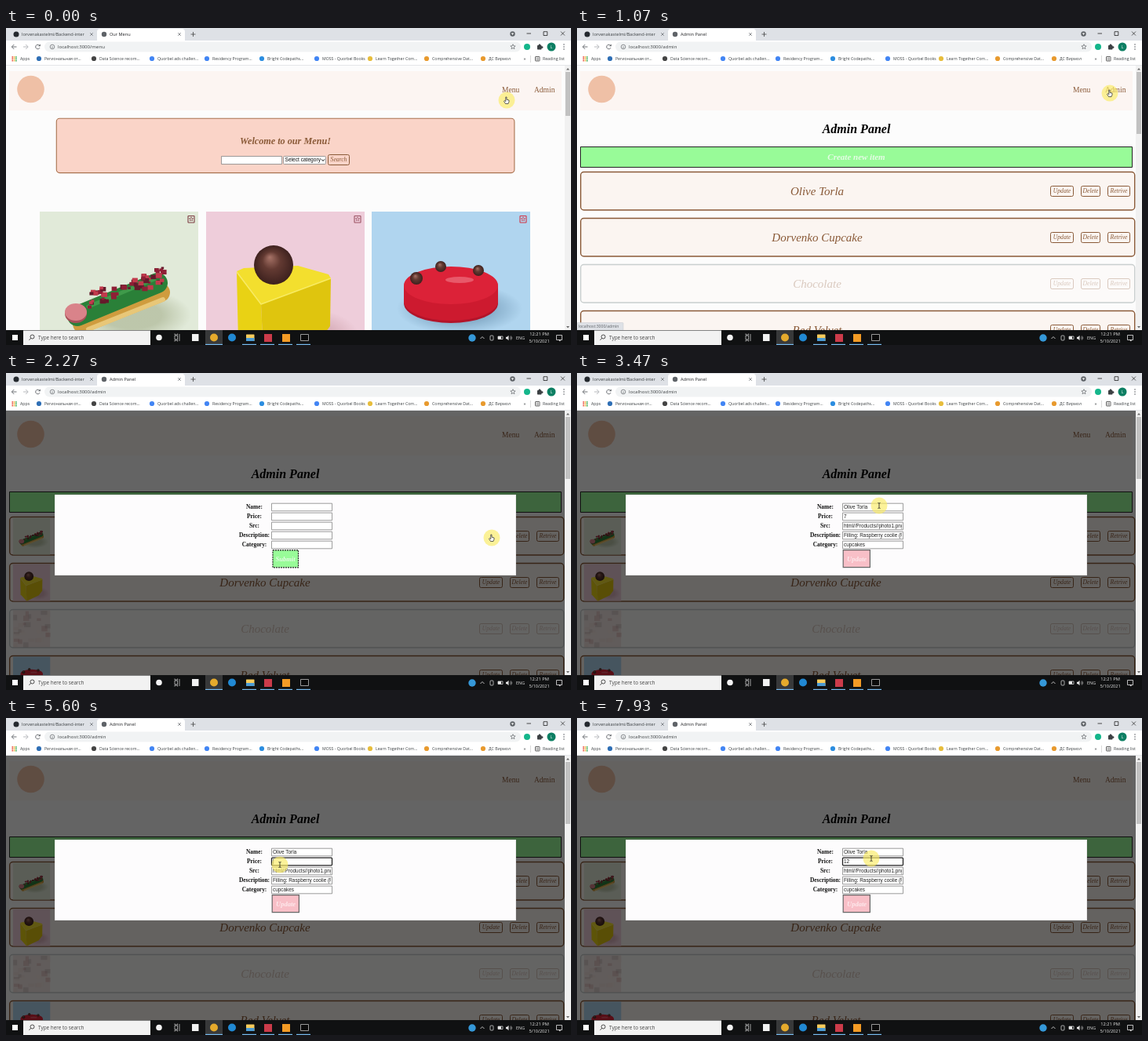
An HTML page with a canvas for the animation above (8000 ms loop, 720 by 404 pixels).

```html
<!DOCTYPE html>
<html lang="en">
<head>
<meta charset="utf-8">
<title>Cake shop admin</title>
<style>
html, body { margin: 0; width: 100%; height: 100%; overflow: hidden; background: #fcfcfc; }
canvas { display: block; width: 720px; height: 404px; }
</style>
</head>
<body>
<canvas id="stage"></canvas>
<script>
const W = 720, H = 404, LOOP = 8000;
const canvas = document.getElementById('stage');
const c = canvas.getContext('2d');
const dpr = window.devicePixelRatio || 1;
canvas.width = W * dpr;
canvas.height = H * dpr;

const UI = '"Open Sans", "Noto Sans", sans-serif';
const SERIF = '"Liberation Serif", serif';
const ARIAL = '"Liberation Sans", sans-serif';
const BROWN = '#8a5a38';

// Times of the hard changes, in ms
const T = { page: 970, images: 1270, modal: 2070, filled: 2400, focus: 4500, clear: 5100, one: 6600, two: 6950 };

// Pointer path: time, x, y
const PATH = [
  [70, 638, 92], [760, 679, 84], [1150, 679, 83], [1720, 621, 208],
  [2200, 619, 210], [2650, 619, 210], [3400, 385, 169], [3800, 385, 169],
  [4400, 349, 187], [7200, 349, 187], [7930, 375, 179]
];

function rect(x, y, w, h, fill, stroke, r = 0, lw = 1) {
  c.beginPath();
  c.roundRect(x, y, w, h, r);
  if (fill) { c.fillStyle = fill; c.fill(); }
  if (stroke) { c.strokeStyle = stroke; c.lineWidth = lw; c.stroke(); }
}

function oval(x, y, rx, ry, fill) {
  c.beginPath();
  c.ellipse(x, y, rx, ry, 0, 0, 7);
  c.fillStyle = fill;
  c.fill();
}

const dot = (x, y, r, fill) => oval(x, y, r, r, fill);

function ring(x, y, r, color, lw = 0.8, from = 0, to = 7) {
  c.beginPath();
  c.arc(x, y, r, from, to);
  c.strokeStyle = color;
  c.lineWidth = lw;
  c.stroke();
}

function trace(pts) {
  c.beginPath();
  for (let i = 0; i < pts.length; i += 2) c.lineTo(pts[i], pts[i + 1]);
}

function line(color, lw, ...pts) {
  trace(pts);
  c.strokeStyle = color;
  c.lineWidth = lw;
  c.stroke();
}

function poly(fill, ...pts) {
  trace(pts);
  c.fillStyle = fill;
  c.fill();
}

// y is the optical middle of the line
function text(s, x, y, size, color, family = UI, style = '', align = 'left') {
  c.font = `${style} ${size}px ${family}`;
  c.textAlign = align;
  c.fillStyle = color;
  c.fillText(s, x, y + size * 0.33);
}

const script = (s, x, y, size, color, weight = '') =>
  text(s, x, y, size, color, SERIF, 'italic ' + weight, 'center');

function cross(x, y, r, color) {
  line(color, 0.7, x - r, y - r, x + r, y + r);
  line(color, 0.7, x - r, y + r, x + r, y - r);
}

function clipped(x, y, w, h, draw) {
  c.save();
  c.beginPath();
  c.rect(x, y, w, h);
  c.clip();
  draw();
  c.restore();
}

function seeded(seed) {
  return () => (seed = (seed * 16807) % 2147483647) / 2147483647;
}

function ball(x, y, r) {
  const g = c.createRadialGradient(x - r * 0.2, y - r * 0.4, 0, x, y, r);
  g.addColorStop(0, '#a87468');
  g.addColorStop(0.45, '#633a32');
  g.addColorStop(1, '#3d211e');
  dot(x, y, r, g);
}

// Soft round shadow that fades out to the edge
function shadow(x, y, rx, ry, rgb) {
  c.save();
  c.translate(x, y);
  c.scale(1, ry / rx);
  const g = c.createRadialGradient(0, 0, rx * 0.5, 0, 0, rx);
  g.addColorStop(0, `rgba(${rgb},.6)`);
  g.addColorStop(1, `rgba(${rgb},0)`);
  dot(0, 0, rx, g);
  c.restore();
}

// Sweets are drawn in a 202 x 202 picture
const sweets = [
  function eclair() {
    rect(0, 0, 202, 202, '#e1ead9');
    shadow(118, 132, 75, 34, '165,175,140');
    c.lineCap = 'round';
    line('#cf9c3e', 24, 54, 143, 154, 103);
    line('#e8c778', 6, 62, 150, 157, 112);
    line('#2a8038', 26, 48, 133, 150, 91);
    line('#3f9a4a', 5, 62, 121, 146, 86);
    c.lineCap = 'butt';
    const rnd = seeded(41);
    for (let i = 0; i < 60; i++) {
      const k = rnd(), s = 3 + rnd() * 5;
      rect(61 + k * 95, 110 - k * 32 + (rnd() - 0.5) * 20, s, s * 0.8, ['#8e1f35', '#c23a4c', '#651a2b'][i % 3]);
    }
    oval(46, 130, 14, 12, '#a84f58');
    oval(46, 128, 14, 11, '#d9838a');
  },
  function wedge() {
    rect(0, 0, 202, 202, '#eecdda');
    shadow(135, 160, 60, 35, '205,160,170');
    c.lineJoin = 'round';
    poly('#e9d214', 39, 77, 70, 118, 74, 202, 41, 166);
    poly('#dfc50e', 70, 118, 159, 84, 158, 146, 140, 170, 74, 202);
    poly('#f3df2e', 39, 76, 48, 72, 117, 69, 156, 80, 159, 85, 70, 118);
    line('#f8eb62', 1.5, 39, 77, 70, 118, 159, 85);
    ball(86, 68, 25);
  },
  function disc() {
    rect(0, 0, 202, 202, '#b0d5ef');
    shadow(112, 124, 80, 32, '105,145,175');
    oval(101, 117, 60, 25, '#b3142a');
    rect(41, 94, 120, 23, '#cd1a2f');
    oval(101, 114, 60, 25, '#cd1a2f');
    oval(101, 94, 60, 24, '#dc2238');
    oval(112, 87, 18, 4, '#e8596a');
    ball(57, 85, 8);
    ball(88, 70, 7);
    ball(136, 75, 7);
  },
  function box() {
    rect(0, 0, 202, 202, '#dcbab6');
    const rnd = seeded(77);
    for (let i = 0; i < 32; i++) {
      rect(rnd() * 180, rnd() * 180, 15 + rnd() * 25, 12 + rnd() * 20, ['#f3e4df', '#c48a8a', '#a59a9c', '#ead0ca'][i % 4]);
    }
  }
];

function photo(draw, x, y, size) {
  clipped(x, y, size, size, () => {
    c.translate(x, y);
    c.scale(size / 202, size / 202);
    draw();
  });
}

function tabs(title) {
  rect(0, 0, W, 16, '#dee1e6');
  dot(13, 8, 3.5, '#24292e');
  text('lorvenakastelmi/Backend-inter', 20, 8, 5.6, '#3c4043');
  cross(109, 8, 1.8, '#5f6368');
  rect(116, 1, 112, 18, '#fff', null, 4);
  dot(125, 8, 3.2, '#5f6368');
  text(title, 132, 8, 5.6, '#202124');
  cross(221, 8, 1.8, '#5f6368');
  line('#444', 0.8, 235.5, 8, 241.5, 8);
  line('#444', 0.8, 238.5, 5, 238.5, 11);
  dot(645.5, 7.5, 3.2, '#5f6368');
  poly('#fff', 643.8, 6.5, 647.2, 6.5, 645.5, 9);
  line('#222', 0.8, 663.5, 7, 669, 7);
  rect(685, 4.7, 4.8, 4.8, null, '#222', 0, 0.8);
  cross(709.5, 7, 2.5, '#222');
}

function toolbar(url) {
  rect(0, 16, W, 32, '#fff');
  const gray = '#5f6368';
  line(gray, 0.9, 13.5, 24, 7.5, 24);
  line(gray, 0.9, 10.3, 21, 7.3, 24, 10.3, 27);
  line('#b0b3b7', 0.9, 22, 24, 28, 24);
  line('#b0b3b7', 0.9, 25.2, 21, 28.2, 24, 25.2, 27);
  ring(40.5, 24, 2.8, gray, 0.9, 0.4, 5.6);
  poly(gray, 41, 23.2, 43.8, 23.2, 43.8, 20.4);
  rect(49, 17.5, 607, 13, '#f1f3f4', null, 6.5);
  ring(59, 24, 2.8, gray, 0.7);
  line(gray, 0.8, 59, 23.4, 59, 25.6);
  text(url, 66, 24, 6.1, '#3c4043');
  star(646, 24, 3.3, gray);
  dot(664, 24, 4, '#15b68b');
  rect(677, 22, 5.5, 5.5, '#3c4043', null, 0.7);
  dot(680, 21.8, 1.4, '#3c4043');
  dot(683, 24.6, 1.4, '#3c4043');
  dot(695, 24, 5.5, '#0d7f63');
  text('L', 695, 24, 5, '#fff', UI, '', 'center');
  for (const y of [21, 24, 27]) dot(711, y, 0.8, gray);
}

function star(x, y, r, color) {
  const pts = [];
  for (let i = 0; i <= 10; i++) {
    const a = -Math.PI / 2 + i * Math.PI / 5, k = i % 2 ? r * 0.45 : r;
    pts.push(x + k * Math.cos(a), y + k * Math.sin(a));
  }
  line(color, 0.7, ...pts);
}

const BOOKMARKS = [
  [42, '#2f6fb5', 'Региональная от...'], [112, '#444', 'Data Science recom...'],
  [186, '#4285f4', 'Quorbel ads challen...'], [256, '#4285f4', 'Residency Program...'],
  [326, '#2b8de0', 'Bright Codepaths...'], [396, '#4285f4', 'MOSS - Quorbel Books'],
  [464, '#e7bd3c', 'Learn Together Com...'], [536, '#e89a2e', 'Comprehensive Dat...'],
  [608, '#e89a2e', 'ДС Вирмол']
];

function bookmarks() {
  for (let i = 0; i < 9; i++) {
    rect(7.5 + (i % 3) * 2.3, 36.2 + Math.floor(i / 3) * 2.3, 1.6, 1.6, ['#ea4335', '#f3ad28', '#34a853'][i % 3]);
  }
  text('Apps', 18, 39.3, 5.2, '#3c4043');
  for (const [x, color, label] of BOOKMARKS) {
    dot(x, 39, 3.1, color);
    text(label, x + 7, 39.3, 5.2, '#3c4043');
  }
  text('»', 661, 39, 6, '#3c4043', UI, '', 'center');
  line('#ccc', 0.7, 668.5, 35, 668.5, 44);
  rect(674.5, 36.5, 5.5, 5.5, null, '#444', 0.5, 0.8);
  for (const y of [38, 39.5, 41]) line('#444', 0.5, 675.5, y, 679, y);
  text('Reading list', 684, 39.3, 5.2, '#3c4043');
  rect(0, 47, W, 1, '#e4e6e9');
}

function header() {
  rect(0, 48, 712, 338, '#fcfcfc');
  rect(4, 55, 704, 50, '#fcf5f2');
  dot(31.5, 78, 17.3, '#efc0a6');
  text('Menu', 632, 78.5, 9.5, BROWN, SERIF);
  text('Admin', 673, 78.5, 9.5, BROWN, SERIF);
}

function scrollbar(end) {
  rect(712, 48, 8, 338, '#f1f1f1');
  rect(713, 56, 6, end - 56, '#c1c1c1');
  poly('#666', 714, 53.5, 718, 53.5, 716, 51);
  poly('#666', 714, 380, 718, 380, 716, 382.5);
}

function outlineButton(label, x, y, w, fill) {
  rect(x + 0.5, y + 0.5, w - 1, 13, fill, BROWN, 2, 1);
  script(label, x + w / 2, y + 6.5, 7.6, BROWN);
}

function menuPage() {
  rect(64.3, 115.2, 583.6, 69.4, '#fad4c8', '#a9724f', 4, 1.1);
  script('Welcome to our Menu!', 356, 143.5, 12.2, BROWN, 'bold');
  rect(274.5, 163.5, 77, 10, '#fff', '#858585', 0, 0.8);
  rect(353.5, 163.5, 54, 10, '#fff', '#858585', 1, 0.8);
  text('Select category', 355.5, 168.3, 6.6, '#111', ARIAL);
  line('#111', 1, 402, 167.3, 404, 169.5, 406, 167.3);
  outlineButton('Search', 410, 161, 28);
  [43, 255, 466].forEach((x, i) => {
    const color = ['#7d3b42', '#9b5263', '#d23445'][i];
    photo(sweets[i], x, 234, 202);
    rect(x + 189, 239.5, 8, 8.5, null, color, 0.5, 1.1);
    star(x + 193, 243.5, 2.7, color);
  });
}

const ROWS = ['Olive Torla', 'Dorvenko Cupcake', 'Chocolate', 'Red Velvet'];
const ROW_SWEETS = [0, 1, 3, 2];

function adminPage(t) {
  const loaded = t >= T.images;
  const hover = t > 1660 && t < T.modal;
  script('Admin Panel', 356, 128.5, 16, '#000', 'bold');
  rect(4.5, 151.5, 703, 26, '#98fb98', '#222', 0, 1);
  script('Create new item', 356, 164.5, 11, '#e6fbe6', 'bold');
  ROWS.forEach((name, i) => {
    const y = 183 + i * 59;
    c.globalAlpha = i === 2 ? 0.3 : 1;
    rect(4.7, y + 0.5, 706, 48.5, '#fbf5f1', i === 2 ? '#566' : BROWN, 4, 1.4);
    if (loaded) photo(sweets[ROW_SWEETS[i]], 9, y + 1.2, 47.5);
    script(name, loaded ? 330 : 306, y + 25, 15, BROWN);
    outlineButton('Update', 603, y + 18, 30, hover && i === 0 ? '#f4bcc2' : null);
    outlineButton('Delete', 642, y + 18, 25);
    outlineButton('Retrive', 676, y + 18, 29);
    c.globalAlpha = 1;
  });
}

function priceAt(t) {
  if (t < T.clear) return '7';
  return t < T.one ? '' : t < T.two ? '1' : '12';
}

function modal(t) {
  rect(0, 48, 712, 338, 'rgba(0,0,0,.6)');
  rect(62, 155, 588, 103, '#d8d8d8');
  rect(62.5, 155.5, 587, 102, '#fdfcfd');
  const filled = t >= T.filled, focused = t >= T.focus;
  const values = ['Olive Torla', priceAt(t), 'html//Products//photo1.png', 'Filling: Raspberry coolie (Fresh)', 'cupcakes'];
  ['Name:', 'Price:', 'Src:', 'Description:', 'Category:'].forEach((label, i) => {
    const y = 171 + i * 12;
    text(label, 316.5, y, 7.4, '#111', SERIF, 'bold', 'center');
    if (i === 1 && focused) rect(338.5, y - 4.8, 77, 9.6, '#fff', '#222', 1, 1.3);
    else rect(338.5, y - 4.8, 77, 9.6, '#fff', '#858585', 0, 0.8);
    if (filled) clipped(340, y - 4.5, 74, 9, () => text(values[i], 340, y, 6.4, '#222', ARIAL));
  });
  if (focused) {
    const last = [T.two, T.one, T.clear, T.focus].find(v => t >= v);
    if (Math.floor((t - last) / 530) % 2 === 0) {
      c.font = `6.4px ${ARIAL}`;
      rect(340.5 + c.measureText(priceAt(t)).width, 179.5, 0.6, 7, '#000');
    }
  }
  if (filled) {
    rect(339.2, 225.7, 34.2, 22, '#f8bfc7', '#666', 0, 1.2);
    script('Update', 356.5, 237, 8.5, '#fde9ec', 'bold');
  } else {
    c.setLineDash([2, 1]);
    rect(340, 225.8, 32.5, 22, '#98fb98', '#222', 0, 1.2);
    c.setLineDash([]);
    script('Submit', 356, 237, 8.5, '#e6fbe6', 'bold');
  }
}

function status() {
  rect(0, 375.5, 59, 10, '#dee1e6', '#c6c9ce', 1, 0.5);
  text('localhost:3000/admin', 2, 380.5, 5.1, '#5f6368');
}

function taskbar() {
  rect(0, 385, W, 19, '#101112');
  rect(8, 391, 7, 7, '#fff');
  rect(22, 385.5, 162, 18.5, '#f2f2f2');
  ring(33.5, 393.5, 2.5, '#222', 0.8);
  line('#222', 0.8, 31.7, 395.3, 29.5, 397.8);
  text('Type here to search', 41, 394.8, 6.4, '#444');
  dot(195, 394.5, 3.8, '#f2f2f2');
  rect(215, 392, 3.6, 5, null, '#ddd', 0, 0.7);
  line('#ddd', 0.7, 215, 389.5, 215, 391, 218.6, 391, 218.6, 389.5);
  line('#ddd', 0.7, 215, 399.5, 215, 398, 218.6, 398, 218.6, 399.5);
  line('#ddd', 0.7, 221, 390, 221, 399);
  rect(254, 385, 22, 19, '#38393a');
  rect(237, 390, 8.5, 9, '#f2f2f2');
  dot(265, 394.5, 5, '#e5aa2c');
  dot(288, 394.5, 5, '#2189d3');
  rect(306, 390.5, 10.5, 8.5, '#f5cb5c', null, 0.6);
  rect(306, 395, 10.5, 4, '#4b9bd4');
  rect(329, 390, 10, 10, '#cb3b4a');
  rect(352, 390, 10, 10, '#f39b25');
  rect(375.5, 390.5, 10, 8, '#0a0a0a', '#bbb', 0, 0.8);
  for (const x of [254, 301, 324, 347, 370]) rect(x, 402.8, x === 254 ? 22 : 18, 1.2, '#76b9ed');

  const pale = '#e8e8e8';
  dot(594, 395, 4.7, '#3598d8');
  line(pale, 0.8, 604.5, 396, 607, 393.5, 609.5, 396);
  rect(617, 392, 4, 6, null, pale, 1, 0.7);
  rect(627, 393, 6, 3.5, null, pale, 0, 0.7);
  rect(627, 393, 4, 3.5, pale);
  poly(pale, 637, 393.7, 638.5, 393.7, 640.5, 391.7, 640.5, 398.3, 638.5, 396.3, 637, 396.3);
  ring(641, 395, 2, pale, 0.6, -0.8, 0.8);
  ring(641, 395, 3.5, pale, 0.6, -0.8, 0.8);
  text('ENG', 650, 395, 5.5, pale);
  text('12:21 PM', 679.5, 390.6, 5.7, pale, UI, '', 'center');
  text('5/10/2021', 679.5, 399.5, 5.5, pale, UI, '', 'center');
  rect(701.5, 391.5, 7, 6, null, pale, 0, 0.8);
  poly(pale, 704, 397.5, 707, 397.5, 706, 399.5);
}

function pointerAt(t) {
  const i = PATH.findIndex(p => p[0] > t);
  if (i === 0) return PATH[0].slice(1);
  if (i < 0) return PATH[PATH.length - 1].slice(1);
  const [t0, x0, y0] = PATH[i - 1], [t1, x1, y1] = PATH[i];
  const k = (t - t0) / (t1 - t0), e = k * k * (3 - 2 * k);
  return [x0 + (x1 - x0) * e, y0 + (y1 - y0) * e];
}

const overAdmin = (x, y) => x > 672 && y < 92;

function pointerKind(x, y, t) {
  if (t >= T.modal) return t < 2330 ? 'hand' : x < 418 ? 'beam' : 'arrow';
  const link = overAdmin(x, y) || (x < 655 && y < 97);
  const button = t >= T.page && x < 633 && y > 200;
  return link || button ? 'hand' : 'arrow';
}

function pointer(t) {
  const [x, y] = pointerAt(t);
  const kind = pointerKind(x, y, t);
  dot(x, y, 10.5, 'rgba(250,236,100,.66)');
  c.save();
  c.translate(x, y);
  c.lineJoin = 'round';
  if (kind === 'beam') {
    line('#222', 0.8, -1.6, -3.5, 0, -3, 1.6, -3.5);
    line('#222', 0.8, 0, -3, 0, 3);
    line('#222', 0.8, -1.6, 3.5, 0, 3, 1.6, 3.5);
  } else {
    const pts = kind === 'hand'
      ? [-1.2, -4, 0, -4, 0, -0.8, 3, 0, 3, 2, 2, 4.5, -1.5, 4.5, -3.5, 1.2, -2.6, 0.5, -1.2, 1.6, -1.2, -4]
      : [-1, -4, -1, 3.5, 0.7, 2, 1.8, 4.5, 2.9, 4, 1.8, 1.5, 4, 1.4, -1, -4];
    poly('#fff', ...pts);
    line('#222', 0.7, ...pts);
  }
  c.restore();
}

function draw(t) {
  const admin = t >= T.page;
  c.setTransform(dpr, 0, 0, dpr, 0, 0);
  c.clearRect(0, 0, W, H);
  tabs(admin ? 'Admin Panel' : 'Our Menu');
  toolbar('localhost:3000/' + (admin ? 'admin' : 'menu'));
  bookmarks();
  header();
  if (admin) adminPage(t); else menuPage();
  if (t >= T.modal) modal(t);
  scrollbar(admin ? 135 : 112);
  if (overAdmin(...pointerAt(t))) status();
  taskbar();
  pointer(t);
}

const start = performance.now();
function tick() {
  draw((performance.now() - start) % LOOP);
  requestAnimationFrame(tick);
}
tick();
</script>
</body>
</html>
```
